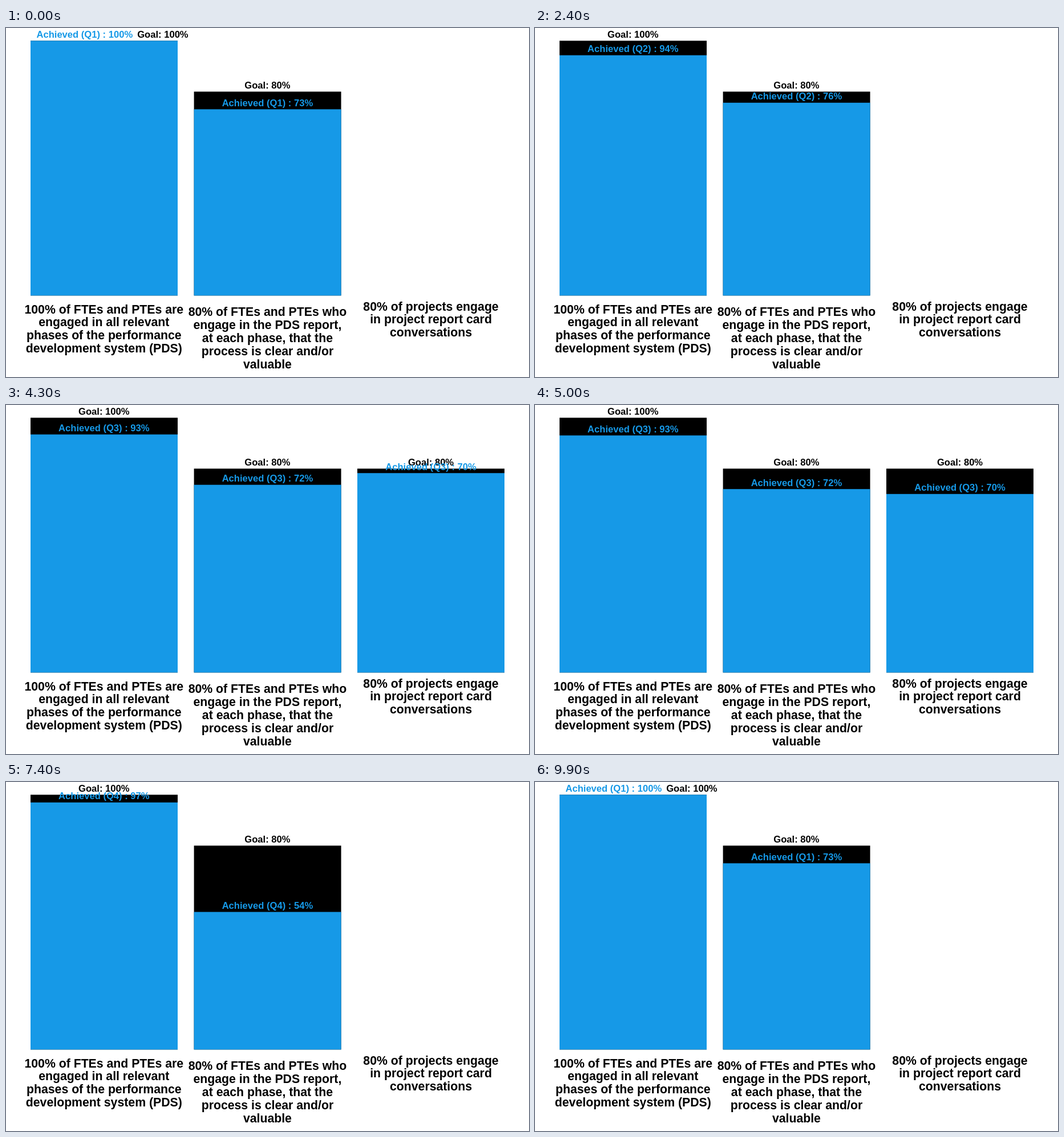
These frames come from a looping animation (917 by 611 pixels, 10 s). An HTML page with a canvas:

```html
<!DOCTYPE html>
<html lang="en">
<head>
<meta charset="utf-8">
<title>Quarterly goals</title>
<style>
  html, body { margin: 0; width: 100%; height: 100%; overflow: hidden; background: #fff; }
  canvas { display: block; }
</style>
</head>
<body>
<canvas id="chart" width="917" height="611"></canvas>
<script>
const ctx = document.getElementById('chart').getContext('2d');
const BLUE = '#1699e7', BLACK = '#000';
const BASE = 468.4, WIDTH = 258, LOOP = 10000, STEP = 100;

// Each quarter's result: the printed percentage and the y of the bar's top.
const bars = [
  { x: 43, goal: 100, goalTop: 22.3, mid: 171.8, textY: 499.5,
    pct: [100, 94, 93, 97], top: [22.3, 49.3, 53.3, 35.8],
    caption: ['100% of FTEs and PTEs are', 'engaged in all relevant',
      'phases of the performance', 'development system (PDS)'] },
  { x: 329.6, goal: 80, goalTop: 111.4, mid: 458.4, textY: 504,
    pct: [73, 76, 72, 54], top: [142.3, 130.1, 147.2, 227.5],
    caption: ['80% of FTEs and PTEs who', 'engage in the PDS report,',
      'at each phase, that the', 'process is clear and/or', 'valuable'] },
  { x: 616, goal: 80, goalTop: 111.4, mid: 745, textY: 494.5,
    pct: [null, 90, 70, null], top: [0, 72.2, 155.8, 0],
    caption: ['80% of projects engage', 'in project report card', 'conversations'] }
];

// Start and end of the move from each quarter to the next.
const moves = [[800, 2500], [3400, 5000], [5800, 7400], [8300, 9900]];

function stateAt(time) {
  for (let from = 0; from < 4; from++) {
    const [start, end] = moves[from];
    if (time < end) {
      const p = Math.max(0, (time - start) / (end - start));
      return { from, to: p ? (from + 1) % 4 : from, p };
    }
  }
  return { from: 0, to: 0, p: 0 };
}

function write(text, x, y, color, size = 16.6) {
  ctx.font = `bold ${size}px "Liberation Sans", Arial, sans-serif`;
  ctx.fillStyle = color;
  ctx.fillText(text, x, y);
}

function fillBar(x, top, color) {
  ctx.fillStyle = color;
  ctx.fillRect(x, top, WIDTH, BASE - top);
}

function drawBar(bar, { from, to, p }) {
  const leaving = bar.pct[to] === null;
  if (bar.pct[from] === null) return;
  const top = leaving ? bar.top[from] : bar.top[from] + (bar.top[to] - bar.top[from]) * p;
  fillBar(bar.x, bar.goalTop, BLACK);
  fillBar(bar.x, top, BLUE);
  if (leaving) return;

  const quarter = p < 0.5 ? from : to;
  // Labels of equal height sit side by side.
  const shared = bar.pct[quarter] === bar.goal;
  write(`Goal: ${bar.goal}%`, shared ? 274.9 : bar.mid, bar.goalTop - 5.6, BLACK);
  write(`Achieved (Q${quarter + 1}) : ${bar.pct[quarter]}%`,
    shared ? 137.8 : bar.mid, top - 5.6, BLUE);
}

function draw(now) {
  const state = stateAt(Math.floor(now % LOOP / STEP) * STEP);
  ctx.fillStyle = '#fff';
  ctx.fillRect(0, 0, 917, 611);
  ctx.textAlign = 'center';
  for (const bar of bars) {
    drawBar(bar, state);
    bar.caption.forEach((line, i) =>
      write(line, bar.mid, bar.textY + i * 22.9, BLACK, 21.25));
  }
  requestAnimationFrame(draw);
}
requestAnimationFrame(draw);
</script>
</body>
</html>
```
